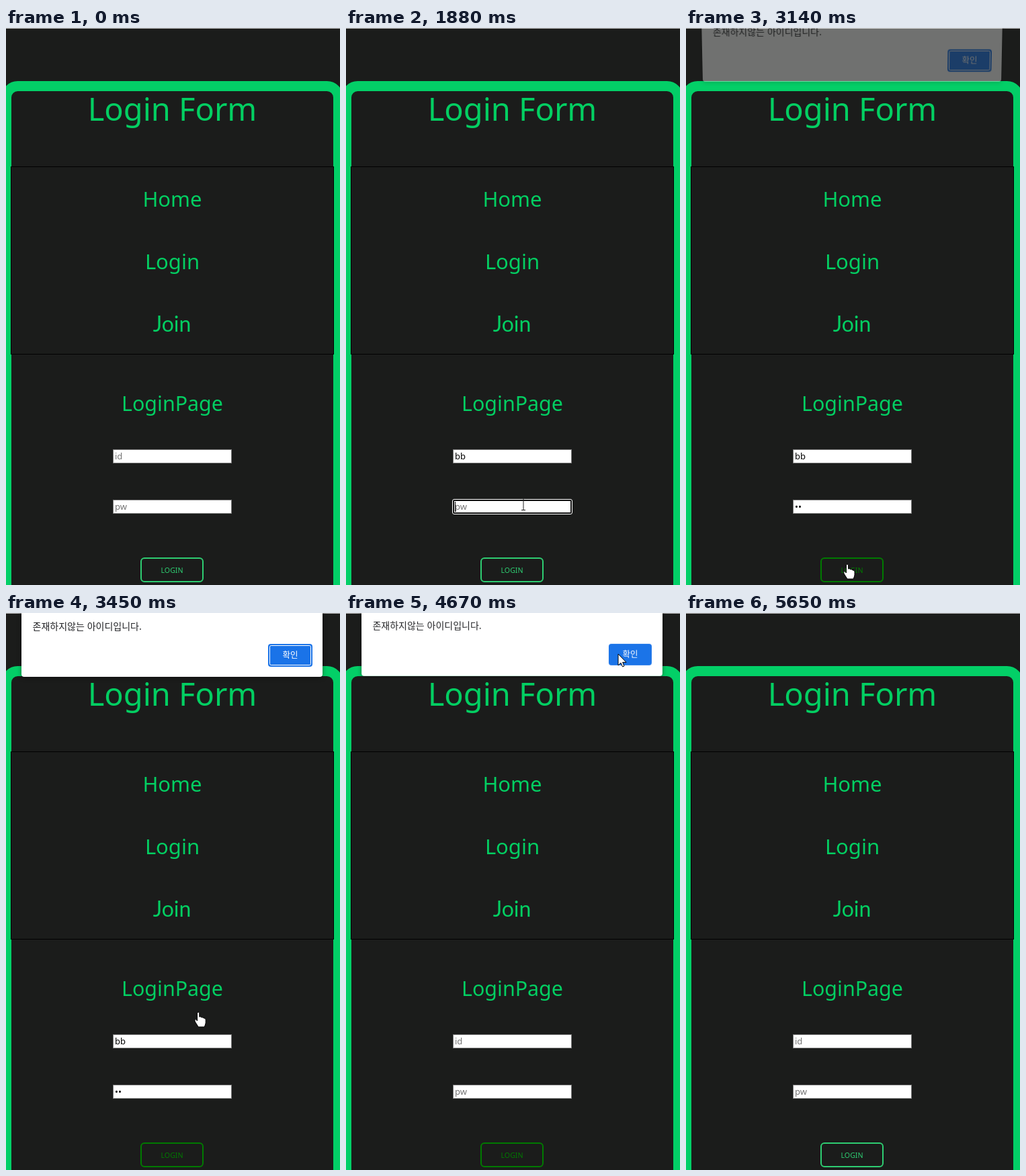
Recreate the animation shown at these times as an HTML page. Size 497x829 px, loop 5780 ms.

```html
<!DOCTYPE html>
<html lang="ko">
<head>
<meta charset="utf-8">
<style>
  html, body { margin: 0; width: 100%; height: 100%; overflow: hidden; background: #1b1c1b; }
  svg { position: absolute; left: 0; top: 0; width: 497px; height: 829px; font-family: "Noto Sans", "Open Sans", sans-serif; }
  .title { fill: #03cf62; font-size: 31px; text-anchor: middle; }
  .input { font-size: 13px; }
  #dialog { font-family: "Noto Sans CJK KR", "Noto Sans CJK JP", "Noto Sans CJK", sans-serif; transform-origin: 50% 0; }
  .panel { filter: drop-shadow(0 1px 3px rgba(0, 0, 0, .5)); }
</style>
</head>
<body>
<svg viewBox="0 0 497 829">
  <rect width="497" height="1" fill="#b8b8b8"/>
  <rect x=".5" y="86.5" width="494" height="900" rx="17" fill="none" stroke="#03cf67" stroke-width="15"/>
  <rect x="7.5" y="206.5" width="480" height="279" fill="#1b1c1b" stroke="#000"/>
  <g class="title">
    <text x="247.5" y="138" font-size="47" style="font-size:47px">Login Form</text>
    <text x="247.5" y="266">Home</text>
    <text x="247.5" y="359">Login</text>
    <text x="247" y="452" style="font-family:Lato,sans-serif;font-size:32px">Join</text>
    <text x="247.5" y="570" style="font-size:30.4px">LoginPage</text>
  </g>
  <g id="fields"></g>
  <g id="button">
    <rect x="201" y="789" width="92" height="35" rx="5" fill="none" stroke="currentColor" stroke-width="2"/>
    <text x="247" y="811" font-size="10.6" text-anchor="middle" fill="currentColor">LOGIN</text>
  </g>
</svg>
<svg id="dialog" viewBox="0 0 497 829">
  <rect class="panel" x="23" y="-20" width="448" height="115" rx="4" fill="#fff"/>
  <text x="39.5" y="25" font-size="14" fill="#202124">존재하지않는 아이디입니다.</text>
  <rect x="391" y="47" width="64" height="32" rx="4" fill="#1a73e8"/>
  <g id="ring">
    <rect x="390" y="46" width="66" height="34" rx="4" fill="#1a73e8"/>
    <rect x="392.5" y="48.5" width="61" height="29" rx="2" fill="none" stroke="#fff"/>
  </g>
  <text x="423" y="67" font-size="12.5" font-weight="500" text-anchor="middle" fill="#fff">확인</text>
</svg>
<svg viewBox="0 0 497 829"><path id="cursor" stroke-linejoin="round"/></svg>
<script>
const LOOP = 5780;
const ENTER = 70, FOCUS_ID = 740, FOCUS_PW = 1880, HOVER = 2490,
      SUBMIT = 2970, CONFIRM = 4540, LEAVE = 4990, RESET = 5650;
const KEYS = { id: [1150, 1350], pw: [2080, 2280] };

const $ = id => document.getElementById(id);
const clamp = v => Math.min(1, Math.max(0, v));
const ramp = (t, from, to) => clamp((t - from) / (to - from));
const mix = (a, b, k) => a + (b - a) * k;

// Cursor moves: start, end, x, y
const moves = [
  [ENTER, 480, 226, 632],       // id field
  [820, 1150, 236, 720],        // pw field
  [1570, 1640, 264, 709],
  [1950, 2080, 238, 788],       // login button
  [HOVER, 2560, 240, 798],
  [3380, 3450, 286, 595],
  [3450, 4000, 390, 64],        // confirm button
  [4070, 4280, 405, 61],
  [4740, LEAVE, 430, 835]
];
const shapes = {
  arrow: 'M0 0V17L4 13.2 6.5 19 9 18 6.6 12.4H12Z',
  hand: 'M-1.6 1Q0-1 1.6 1V7Q4 6 5 8Q7 7 8 9Q10.5 8.5 11 11V16Q10.5 19 9 22H0L-5 14Q-6 11-4 10.5L-1.6 13Z',
  beam: 'M-3-8.5H3M0-8.5V8.5M-3 8.5H3'
};

function drawCursor(t) {
  let x = 424, y = 808;
  for (const [from, to, nextX, nextY] of moves) {
    const k = ramp(t, from, to);
    x = mix(x, nextX, k);
    y = mix(y, nextY, k);
  }
  const inField = top => y > top && y < top + 21 && x < 336;
  const kind = t >= 2560 && t < 4000 ? 'hand' : inField(627) || inField(702) ? 'beam' : 'arrow';
  const beam = kind === 'beam', c = $('cursor');
  c.style.display = t >= ENTER && t < LEAVE ? '' : 'none';
  c.setAttribute('d', shapes[kind]);
  c.setAttribute('transform', `translate(${x} ${y})`);
  c.setAttribute('fill', beam ? 'none' : '#fff');
  c.setAttribute('stroke', beam ? '#222' : '#000');
}

function field(y, hint, value, step, focused) {
  const caret = 162.5 + value.length * step;
  const box = focused
    ? `<rect x="158.5" y="${y - .5}" width="178" height="22" rx="2.5" fill="#101010" stroke="#fff"/>
       <rect x="161" y="${y + 2}" width="173" height="17" fill="#fff"/>`
    : `<rect x="159.5" y="${y + .5}" width="176" height="20" fill="#fff" stroke="#767676"/>`;
  return `${box}<text class="input" x="162" y="${y + 15}" fill="${value ? '#000' : '#757575'}">${value || hint}</text>` +
    (focused ? `<path d="M${caret} ${y + 3}v15" stroke="#000"/>` : '');
}

function drawDialog(t) {
  const shown = t < CONFIRM
    ? ramp(t, 3020, 3250) ** 1.6
    : 1 - ramp(t, CONFIRM, 4970) ** 2.5;
  const away = 1 - shown;
  const d = $('dialog');
  d.style.opacity = clamp(1.05 * shown);
  d.style.transform = `perspective(600px) translateY(${-22 * away}px) rotateX(${-5 * away}deg)`;
  $('ring').style.display = t < CONFIRM ? '' : 'none';
}

function draw(t) {
  const typed = (name, char) =>
    t < CONFIRM + 60 ? char.repeat(KEYS[name].filter(k => t >= k).length) : '';
  $('fields').innerHTML =
    field(627, 'id', typed('id', 'b'), 8, t >= FOCUS_ID && t < FOCUS_PW) +
    field(702, 'pw', typed('pw', '•'), 5, t >= FOCUS_PW && t < SUBMIT);

  const hover = t < RESET ? ramp(t, HOVER, HOVER + 350) : 0;
  $('button').style.color = `rgb(${mix(46, 0, hover)},${mix(204, 122, hover)},${mix(113, 0, hover)})`;

  drawDialog(t);
  drawCursor(t);
}

const start = performance.now();
function loop() {
  draw((performance.now() - start) % LOOP);
  requestAnimationFrame(loop);
}
loop();
</script>
</body>
</html>
```
